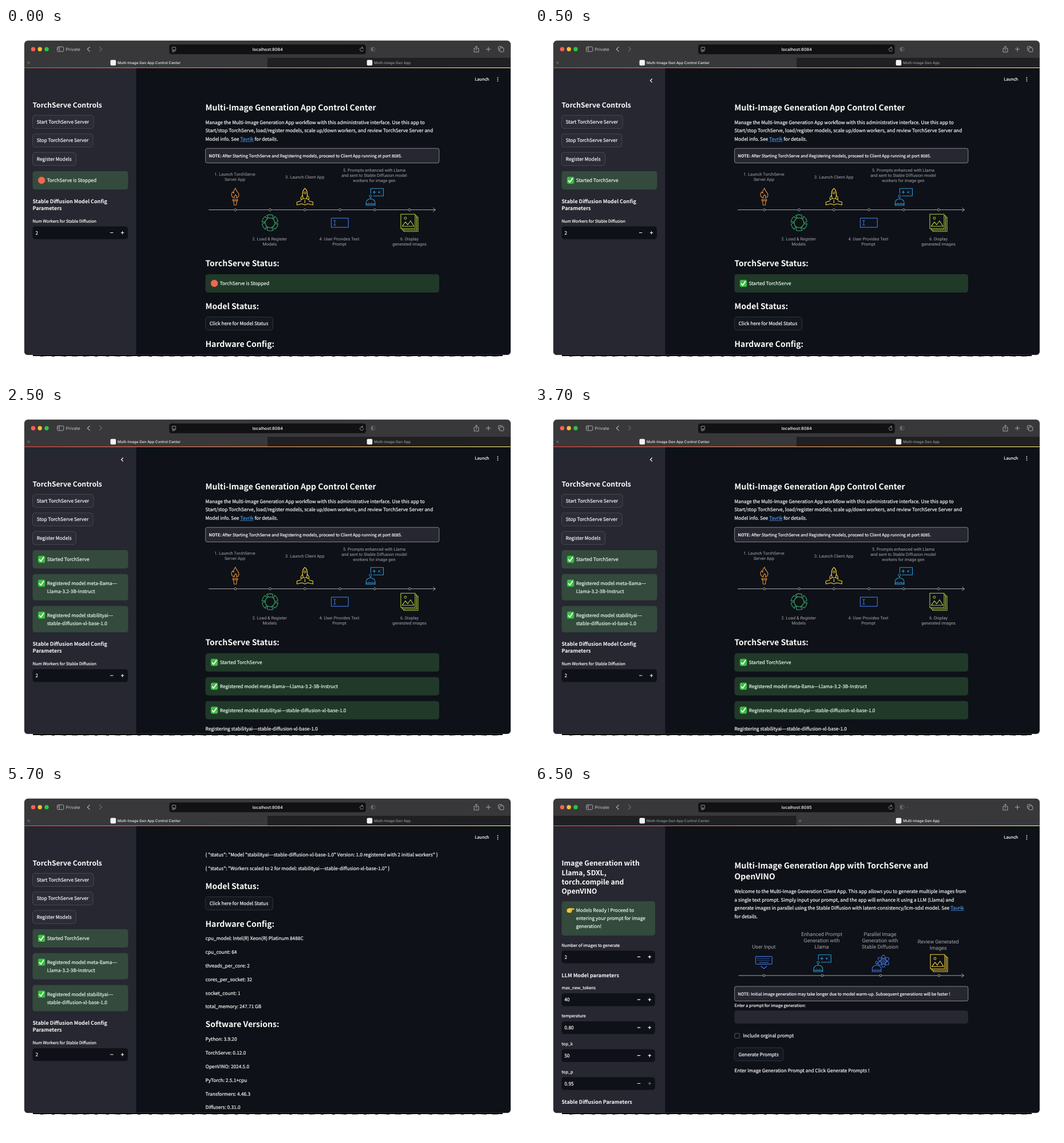
An HTML page with a canvas for the animation above (8000 ms loop, 914 px wide and 613 px high).

```html
<!DOCTYPE html>
<html lang="en">
<head>
<meta charset="utf-8">
<title>Control Center</title>
<style>
html, body { margin: 0; width: 100%; height: 100%; overflow: hidden; background: #fff; }
canvas { display: block; width: 914px; height: 613px; }
</style>
</head>
<body>
<canvas id="stage"></canvas>
<script>
const W = 914, H = 613, LOOP = 8000;
const canvas = document.getElementById('stage');
const dpr = window.devicePixelRatio || 1;
canvas.width = W * dpr;
canvas.height = H * dpr;
const c = canvas.getContext('2d');

const APP = '"Noto Sans CJK SC", "Noto Sans CJK JP", "Noto Sans CJK KR", "Noto Sans CJK", "Open Sans", sans-serif';
const UI = 'Inter, Roboto, sans-serif';
const DIAGRAM = 'Roboto, sans-serif';
const INK = '#fafafa', SIDE = '#262730', PAGE = '#0e1117', LINK = '#4b9bf0', GREY = '#a4a5a9';
const BODY = 8.3, SMALL = 7.26;
const SX = 46.5, MX = 348.5;

// Text is placed by the middle of its capitals; returns the end x.
function text(s, x, y, size = BODY, o = {}) {
  c.font = `${o.weight || 400} ${size}px ${o.font || APP}`;
  c.textAlign = o.align || 'left';
  c.fillStyle = c.strokeStyle = o.color || INK;
  c.fillText(s, x, y + size * 0.365);
  if (!o.weight && !o.font) {
    // slightly heavier strokes for regular text
    c.lineWidth = 0.2;
    c.strokeText(s, x, y + size * 0.365);
  }
  return x + c.measureText(s).width;
}
const rows = (list, x, y, step, size, o) => list.forEach((s, i) => text(s, x, y + i * step, size, o));
const h2 = (s, y) => text(s, MX, y, 14.03, { weight: 600 });
const h3 = (s, y) => text(s, SX, y, 12.15, { weight: 600 });
const h5 = (s, y) => text(s, SX, y, 9.02, { weight: 600 });
const label = (s, y, x = SX) => text(s, x, y, SMALL);

function box(x, y, w, h, r, fill, edge, lw = 0.7) {
  c.beginPath();
  c.roundRect(x, y, w, h, r);
  if (fill) { c.fillStyle = fill; c.fill(); }
  if (edge) { c.strokeStyle = edge; c.lineWidth = lw; c.stroke(); }
}
function dot(x, y, r, fill, edge, lw = 1) {
  c.beginPath();
  c.arc(x, y, r, 0, Math.PI * 2);
  if (fill) { c.fillStyle = fill; c.fill(); }
  if (edge) { c.strokeStyle = edge; c.lineWidth = lw; c.stroke(); }
}
function draw(d, x, y, color, lw = 1.1, fill) {
  c.save();
  c.translate(x, y);
  c.lineCap = c.lineJoin = 'round';
  const p = new Path2D(d);
  if (fill) { c.fillStyle = fill; c.fill(p); }
  if (color) { c.strokeStyle = color; c.lineWidth = lw; c.stroke(p); }
  c.restore();
}

// Emoji
function tick(x, y) {
  box(x - 6, y - 6, 12, 12, 2.2, '#3fbf45', '#2f9f38', 0.6);
  draw('M-3.6 .6 -1.2 3.4 3.6 -3.6', x, y, '#fff', 1.7);
}
function stopSign(x, y) {
  const g = c.createLinearGradient(0, y - 6, 0, y + 6);
  g.addColorStop(0, '#ee6a50');
  g.addColorStop(0.5, '#d8452c');
  g.addColorStop(1, '#b02c18');
  draw('M-2.5 -6H2.5L6 -2.5V2.5L2.5 6H-2.5L-6 2.5V-2.5Z', x, y, '#a83a28', 0.5, g);
}
function hand(x, y) {
  draw('M-6 -2 -2 -4 1 -3.4H5.4C7 -3.4 7 -1.2 5.4 -1.2H2.2C3 0 2.6 1 2 1.4 2 3 1 4 0 4H-3L-6 3Z', x, y, '#d99a1c', 0.5, '#fbc83a');
  draw('M-1 -.8H2M-1 1.4H1.8', x, y, '#d99a1c', 0.6);
}

// Widgets
function button(s, x, y, w) {
  box(x, y, w, 23, 4.6, x < 228 ? '#2b2c36' : '#131720', 'rgba(250,250,250,.2)');
  text(s, x + 7.3, y + 11.5);
}
function alert(icon, lines, x, y, w) {
  const h = 18 + 14 * lines.length;
  box(x, y, w, h, 4.6, 'rgba(104,212,118,.2)');
  icon(x + 15.6, y + 16);
  rows(lines, x + 25.2, y + 16.2, 14, BODY, { color: '#e8fbee' });
}
function stepper(value, y, right, dimPlus) {
  box(SX, y, right - SX, 22.3, 4.6, PAGE);
  text(value, 51.5, y + 11.2);
  draw('M-2.2 0H2.2', right - 28.3, y + 11, INK, 1.2);
  draw('M-2.2 0H2.2M0 -2.2V2.2', right - 9.5, y + 11, dimPlus ? '#777a80' : INK, 1.2);
}
function note(y, s, bold) {
  box(MX + 0.2, y, 408.2, 25.5, 3, SIDE, '#c0c1c6', 0.65);
  const x = bold ? text(bold, 354.5, y + 13, SMALL, { weight: 600 }) : 354.5;
  text(s, x, y + 13, SMALL);
}
function link(s, x, y) {
  const end = text(s, x, y, BODY, { color: LINK });
  c.fillStyle = LINK;
  c.fillRect(x, y + 4.2, end - x, 0.7);
  return end;
}

// Diagram icons
function robot(x, y, color) {
  draw('M-15.2 15V10.5C-15.2 1.5 .5 1.5 .5 10.5V15ZM-7.5 3.5V1M-10.3 10.2H-10.1M-4.9 10.2H-4.7M-15 12.6H.3', x, y, color);
  dot(x - 7.5, y - 1.2, 2.1, null, color);
}
function gamer(x, y, color) {
  robot(x, y, color);
  draw('M-7 -6V-14.5H15V-1.5H-2.5M-3.5 -8H1.5M-1 -10.5V-5.5M6 -8H9M7.5 -9.5V-6.5M11.2 -10.5V-10.3M11.2 -5.5V-5.3', x, y, color);
}
function pictures(x, y, color) {
  draw('M-15 -15H10V10H-15ZM10 -12.5H12.5V12.5H-12.5V10M12.5 -10H15V15H-10V12.5', x, y, color);
  draw('M-12.5 6 -7 -1.5 -3 3.5 2 -3.5 8 6Z', x, y, color);
  dot(x - 7, y - 8, 2, null, color);
}
function ring(x, y, color) {
  for (let i = 0; i < 6; i++) {
    const a = i * Math.PI / 3 + 0.1;
    c.beginPath();
    c.arc(x, y, 14, a, a + 0.78);
    c.arc(x, y, 8.5, a + 1.02, a + 0.16, true);
    c.closePath();
    c.strokeStyle = color;
    c.lineWidth = 1.1;
    c.stroke();
  }
}
function timeline(x0, x1, y, stops) {
  draw(`M${x0} ${y}H${x1}m-4 -3.2 4 3.2 -4 3.2`, 0, 0, GREY, 1);
  stops.forEach(x => dot(x, y, 1.9, PAGE, GREY, 1));
}
function caption(lines, x, y, step, size) {
  rows(lines, x, y, step, size, { font: DIAGRAM, align: 'center', color: GREY });
}

function workflow() {
  timeline(354.5, 750.5, 317.5, [400.8, 461.5, 522.4, 583.6, 644.4, 705.3]);
  const cap = (x, y, ...lines) => caption(lines, x, y, 9.1, 7.48);
  cap(400, 255.3, '1. Launch TorchServe', 'Server App');
  cap(522.3, 259.8, '3. Launch Client App');
  cap(643.5, 247.8, '5. Prompts enhanced with Llama', 'and sent to Stable Diffusion model', 'workers for image gen');
  cap(460.7, 367.8, '2. Load & Register', 'Models');
  cap(582.5, 367.8, '4. User Provides Text', 'Prompt');
  cap(705, 367.8, '6. Display', 'generated images');

  draw('M-1.6 1.6C-8 0 -7.2 -6 -4.6 -9 -4 -7.4 -3.4 -6.8 -2.4 -6.6 -3 -10 -2 -13 .6 -15.3 .4 -10.5 6.4 -8.6 6.4 -3.2 6.4 -.4 4.4 1.4 2 1.8 3.4 -.6 2.2 -2.6 .4 -4 .2 -2 -2.6 -1.4 -1.6 1.6ZM-4.2 4.2H4.2V6.6H-4.2ZM-3 6.6 -2 14.3H2L3 6.6', 400.6, 295, '#e58f3a');
  const yellow = '#f2d23c';
  draw('M0 -15C5 -11 5 -4 3 3H-3C-5 -4 -5 -11 0 -15ZM-4 -3 -7 1V5L-3 3M4 -3 7 1V5L3 3M-7 7 -14 9V14L-5 12 0 14 5 12 14 14V9L7 7M0 5.5V10.5', 522.4, 295, yellow);
  dot(522.4, 288, 1.8, null, yellow);
  gamer(644.5, 294.8, '#3096d8');
  ring(461.4, 340.2, '#3aa866');
  box(568.5, 332.2, 29.8, 16, 0.5, null, '#3d6fd6', 1.2);
  draw('M-1.8 -4H1.8M0 -4V4M-1.8 4H1.8', 574.5, 340.2, '#3d6fd6');
  pictures(705, 340.2, '#b3cf3b');
}

function browser(client) {
  box(32, 22, 850, 549, 6, '#38383a');
  dot(47.5, 37, 3.7, '#ff5f57');
  dot(59.2, 37, 3.7, '#febc2e');
  dot(71, 37, 3.7, '#28c840');
  const soft = '#b4b4b6', dim = '#6a6a6c';
  box(89.5, 32.9, 11.2, 8.2, 1.6, null, soft, 0.9);
  draw('M93.3 33V41M90.9 35H92M90.9 37H92', 0, 0, soft, 0.8);
  text('Private', 104.5, 37.2, 7.5, { font: UI, weight: 500, color: soft });
  draw('M2 -3.8 -2 0 2 3.8', 144.3, 37, soft);
  draw('M-2 -3.8 2 0 -2 3.8', 165.3, 37, dim);

  box(285.3, 28.8, 343.5, 17, 4, '#111113');
  box(290.3, 33.5, 6.4, 4.8, 0.8, null, soft, 0.8);
  draw('M290.5 39.8H296.5M290.5 41.3H294.5', 0, 0, soft, 0.7);
  text('localhost:' + (client ? 8085 : 8084), 457.3, 37.4, 7.4, { font: UI, weight: 500, align: 'center' });
  draw('M2.8 -1.2A3 3 0 1 0 3 .8M.2 -3.2 1.8 -3.1 1 -4.8', 621.5, 37.7, soft, 0.8);
  dot(641.5, 37, 3.7, null, dim, 0.8);
  draw('M641.5 33.3A3.7 3.7 0 0 0 641.5 40.7Z', 0, 0, null, 0, dim);
  if (client) draw('M-.7 -1.4 .7 0 -.7 1.4', 651, 37.3, dim, 0.7);
  draw('M-2 -1.5H-4V5H4V-1.5H2M0 2V-5.2M-2 -3.3 0 -5.3 2 -3.3', 822, 37, soft, 0.9);
  draw('M-3.7 0H3.7M0 -3.7V3.7', 843, 37, soft, 0.9);
  box(860.5, 32.3, 6.8, 6.8, 1.4, null, soft, 0.9);
  box(862.8, 34.6, 7, 7, 1.4, '#38383a', soft, 0.9);

  c.fillStyle = '#202022';
  if (client) c.fillRect(32, 52, 424.8, 17);
  else c.fillRect(457, 52, 425, 17);
  draw('M-1.7 -1.7 1.7 1.7M1.7 -1.7 -1.7 1.7', client ? 463.3 : 39.4, 60.8, '#a0a0a2', 0.7);
  const tab = (s, x, on) => {
    box(x - 12.5, 55.8, 9.6, 9.6, 2, '#f2f2f2');
    text(s, x, 60.7, 6.3, { font: UI, weight: 500, color: on ? '#f2f2f2' : '#98989a' });
  };
  tab('Multi-Image Gen App Control Center', 195, !client);
  tab('Multi-image Gen App', 643.2, client);

  c.fillStyle = PAGE;
  c.fillRect(32, 69, 850, 502);
  c.fillStyle = SIDE;
  c.fillRect(32, 69, 195.6, 502);
  const g = c.createLinearGradient(32, 0, 882, 0);
  g.addColorStop(0, '#ff4b4b');
  g.addColorStop(1, '#fffd80');
  c.fillStyle = g;
  c.fillRect(32, 69, 850, 1);

  text('Launch', 819.3, 89.8, SMALL);
  [86.6, 89.6, 92.6].forEach(y => dot(859.4, y, 0.95, INK));
}

const LLAMA = 'meta-llama---Llama-3.2-3B-Instruct', SDXL = 'stabilityai---stable-diffusion-xl-base-1.0';

function controls(stage) {
  if (stage === 1 || stage === 2) draw('M1.5 -2.8 -1.5 0 1.5 2.8', 203, 91.8, INK, 1.2);
  h3('TorchServe Controls', 135);
  button('Start TorchServe Server', SX, 152.4, 106.7);
  button('Stop TorchServe Server', SX, 184.9, 105.5);
  button('Register Models', SX, 217.3, 76);
  const state = stage ? 'Started TorchServe' : 'TorchServe is Stopped';
  alert(stage ? tick : stopSign, [state], SX, 250, 167);
  let y = 302.5;
  if (stage > 1) {
    alert(tick, ['Registered model meta-llama---', 'Llama-3.2-3B-Instruct'], SX, 291.8, 167);
    alert(tick, ['Registered model stabilityai---', 'stable-diffusion-xl-base-1.0'], SX, 347.6, 167);
    y += 111.5;
  }
  h5('Stable Diffusion Model Config', y);
  h5('Parameters', y + 12.2);
  label('Num Workers for Stable Diffusion', y + 34.6);
  stepper('2', y + 44, 213);
}

function overview(stage) {
  h2('Multi-Image Generation App Control Center', 139);
  rows(['Manage the Multi-Image Generation App workflow with this administrative interface. Use this app to',
    'Start/stop TorchServe, load/register models, scale up/down workers, and review TorchServe Server and'], MX, 164.8, 14.6);
  const x = link('Tavrik', text('Model info. See ', MX, 194), 194);
  text(' for details.', x, 194);
  note(210.2, ' After Starting TorchServe and Registering models, proceed to Client App running at port 8085.', 'NOTE:');
  workflow();
  h2('TorchServe Status:', 411.2);
  alert(stage ? tick : stopSign, [stage ? 'Started TorchServe' : 'TorchServe is Stopped'], MX, 430, 408.5);
  if (stage > 1) {
    alert(tick, ['Registered model ' + LLAMA], MX, 471.7, 408.5);
    alert(tick, ['Registered model ' + SDXL], MX, 513.5, 408.5);
    text('Registering ' + SDXL, MX, 562.3);
  } else {
    h2('Model Status:', 485.8);
    button('Click here for Model Status', MX, 504.7, 118);
    h2('Hardware Config:', 551.4);
  }
}

function details() {
  rows([`{ "status": "Model "${SDXL}" Version: 1.0 registered with 2 initial workers" }`,
    `{ "status": "Workers scaled to 2 for model: ${SDXL}" }`], MX, 120.1, 23.8);
  h2('Model Status:', 174.7);
  button('Click here for Model Status', MX, 193.5, 118);
  h2('Hardware Config:', 240.4);
  rows(['cpu_model: Intel(R) Xeon(R) Platinum 8488C', 'cpu_count: 64', 'threads_per_core: 2',
    'cores_per_socket: 32', 'socket_count: 1', 'total_memory: 247.71 GB'], MX, 266.4, 23.8);
  h2('Software Versions:', 416.2);
  rows(['Python: 3.9.20', 'TorchServe: 0.12.0', 'OpenVINO: 2024.5.0',
    'PyTorch: 2.5.1+cpu', 'Transformers: 4.46.3', 'Diffusers: 0.31.0'], MX, 442.3, 23.8);
}

function client() {
  ['Image Generation with', 'Llama, SDXL,', 'torch.compile and', 'OpenVINO'].forEach((s, i) => h3(s, 135 + i * 16.3));
  alert(hand, ['Models Ready ! Proceed to', 'entering your prompt for image', 'generation!'], SX, 201.2, 163.5);
  label('Number of images to generate', 278);
  stepper('2', 287.4, 209.8);
  h5('LLM Model parameters', 330.3);
  [['max_new_tokens', '40'], ['temperature', '0.80'], ['top_k', '50'], ['top_p', '0.95']].forEach(([s, v], i) => {
    label(s, 352.7 + i * 48.8);
    stepper(v, 362.1 + i * 48.8, 209.8, i === 3);
  });
  h5('Stable Diffusion Parameters', 551.6);

  h2('Multi-Image Generation App with TorchServe and', 139);
  h2('OpenVINO', 158.3);
  rows(['Welcome to the Multi-Image Generation Client App. This app allows you to generate multiple images from',
    'a single text prompt. Simply input your prompt, and the app will enhance it using a LLM (Llama) and'], MX, 184.1, 14.5);
  link('Tavrik', text('generate images in parallel using the Stable Diffusion with latent-consistency/lcm-sdxl model. See ', MX, 213.1), 213.1);
  text('for details.', MX, 227.6);

  timeline(356, 749.5, 331, [400, 502, 604, 706]);
  const cap = (x, y, ...lines) => caption(lines, x, y, 11, 9.05);
  cap(400, 280.5, 'User Input');
  cap(501, 258.5, 'Enhanced Prompt', 'Generation with', 'Llama');
  cap(603, 258.5, 'Parallel Image', 'Generation with', 'Stable Diffusion');
  cap(704.8, 271.5, 'Review Generated', 'Images');
  const blue = '#3f72dd';
  box(385.5, 297.6, 28.8, 13.6, 1.5, null, blue, 1.2);
  c.save();
  c.setLineDash([0.2, 2.6]);
  draw('M389 301.2H411M389 304.4H411', 0, 0, blue, 1.4);
  c.restore();
  draw('M392 308H408M395 314.8 400 319 405 314.8', 0, 0, blue, 1.2);
  gamer(502.3, 309.3, '#3096d8');
  robot(604.5, 309.3, blue);
  for (let i = 0; i < 3; i++) {
    c.beginPath();
    c.ellipse(609, 306, 10.8, 4, Math.PI / 6 + i * Math.PI / 3, 0, Math.PI * 2);
    c.strokeStyle = blue;
    c.lineWidth = 1.1;
    c.stroke();
  }
  dot(609, 306, 1.6, null, blue);
  pictures(706, 309.3, '#f2d23c');

  note(350, 'NOTE: Initial image generation may take longer due to model warm-up. Subsequent generations will be faster !');
  label('Enter a prompt for image generation:', 383, MX);
  box(MX, 392, 408.5, 23, 4.6, SIDE);
  box(349, 432, 8.4, 8.4, 2, null, 'rgba(250,250,250,.4)', 0.8);
  text('Include orginal prompt', 363.5, 436.4);
  button('Generate Prompts', MX, 457, 85.5);
  text('Enter Image Generation Prompt and Click Generate Prompts !', MX, 496.7);
}

function render(t) {
  const stage = t < 500 ? 0 : Math.min(4, 1 + Math.floor((t - 500) / 2000));
  c.setTransform(dpr, 0, 0, dpr, 0, 0);
  c.textRendering = 'geometricPrecision';
  c.fillStyle = '#fff';
  c.fillRect(0, 0, W, H);
  // ragged shadow below the window
  c.fillStyle = '#000';
  c.fillRect(47, 569, 821, 4);
  for (let x = 50; x < 865; x += 5) c.fillRect(x, 573, 5, Math.max(0, Math.sin(x * 12.9)) * 0.7);

  c.save();
  c.beginPath();
  c.roundRect(32, 22, 850, 549, 6);
  c.clip();
  browser(stage === 4);
  if (stage === 4) {
    client();
  } else {
    controls(stage);
    if (stage === 3) details();
    else overview(stage);
  }
  c.restore();
  box(32.3, 22.3, 849.4, 548.4, 6, null, '#4a4a4c', 0.6);
}

function loop() {
  render(performance.now() % LOOP);
  requestAnimationFrame(loop);
}
loop();
</script>
</body>
</html>
```
